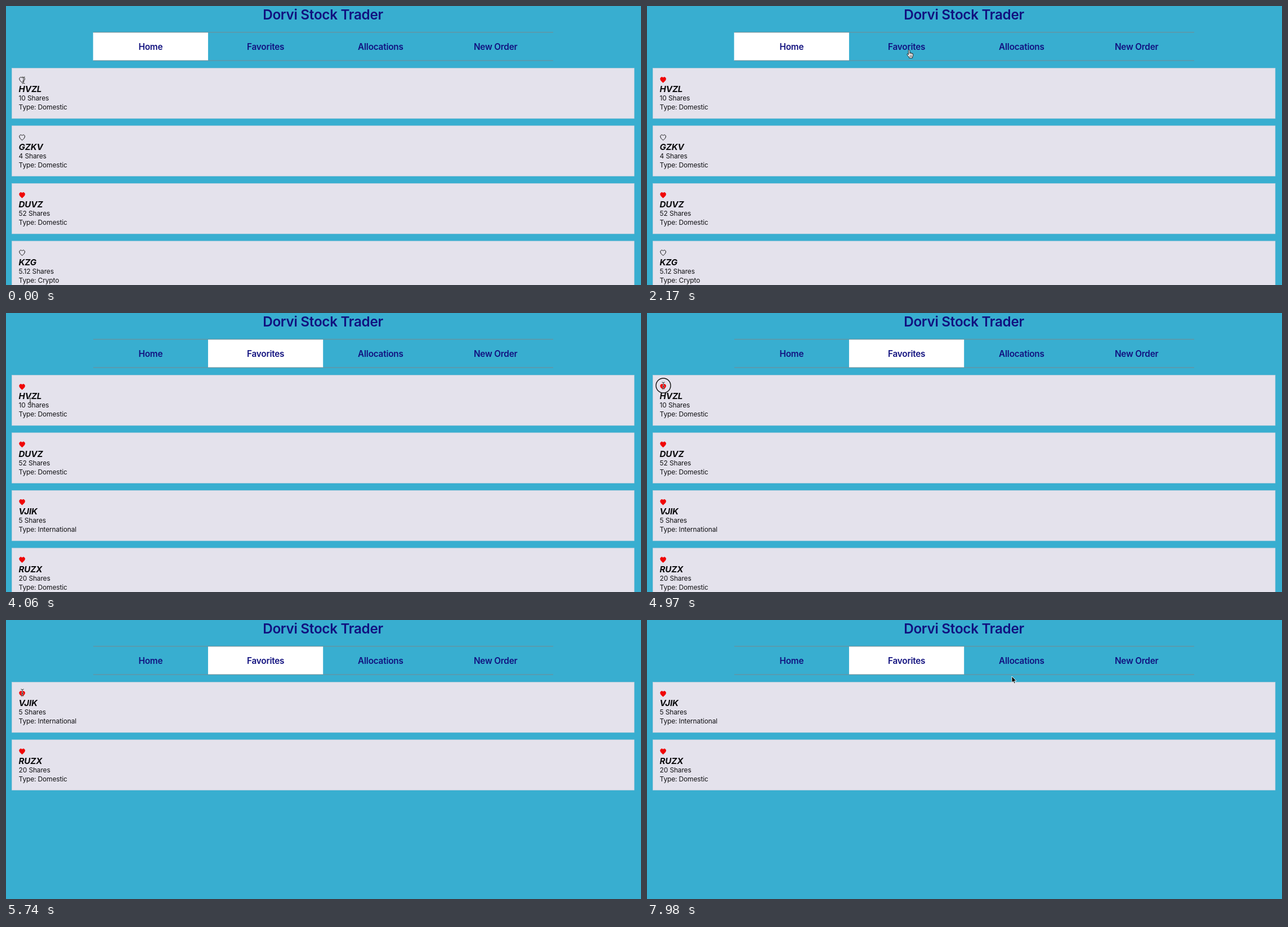
Write an HTML page that moves like this. It is 1128 by 496 pixels and loops after 8000 ms.

```html
<!DOCTYPE html>
<html lang="en">
<head>
<meta charset="utf-8">
<title>Stock list</title>
<style>
  html, body { margin: 0; width: 100%; height: 100%; overflow: hidden; background: #38aed0; }
  svg { display: block; width: 1128px; height: 496px; }
  text { font-family: Inter, "Liberation Sans", sans-serif; letter-spacing: -.013em; }
  .title { font-size: 24.3px; font-weight: 600; fill: #11117f; text-anchor: middle; }
  .tab { font-size: 15.3px; font-weight: 600; fill: #11117f; text-anchor: middle; }
  .name { font-size: 15.2px; font-weight: 700; font-style: italic; fill: #0b0b0d; }
  .info { font-size: 12px; fill: #111114; }
</style>
</head>
<body>
<svg id="stage" viewBox="0 0 1128 496">
  <rect width="1128" height="496" fill="#38aed0"/>
  <text class="title" x="563" y="24">Dorvi Stock Trader</text>
  <g id="nav">
    <rect id="active" y="47" width="204.25" height="50" fill="#fff"/>
    <path d="M155 46.8H972M155 97H972" stroke="#77898f"/>
  </g>
  <g id="cards"></g>
  <circle id="ring" r="13" fill="none" stroke="#111" stroke-width="1.4"/>
  <g id="beam" fill="none" stroke-linecap="round">
    <path id="beamLine" d="M-2.2 -6Q-.4 -6 0 -4.8Q.4 -6 2.2 -6M0 -4.8V4.8M-2.2 6Q-.4 6 0 4.8Q.4 6 2.2 6M-1.2 1.6H1.2" stroke="#fff" stroke-opacity=".6" stroke-width="2"/>
    <use href="#beamLine" style="stroke:#111"/>
    <path d="M-2.2 -6Q-.4 -6 0 -4.8Q.4 -6 2.2 -6M0 -4.8V4.8M-2.2 6Q-.4 6 0 4.8Q.4 6 2.2 6M-1.2 1.6H1.2" stroke="#16161a"/>
  </g>
  <path id="arrow" d="M0 0V11.4L2.6 9L4.4 13.1L6.3 12.3L4.6 8.3H8.1Z" fill="#080808" stroke="#fff" stroke-width=".9" stroke-linejoin="round"/>
  <g id="hand" stroke="#111" stroke-width=".9" stroke-linejoin="round" stroke-linecap="round">
    <path d="M-1.6 7.4V.6Q-1.5 -.7 -.4 -.7Q.7 -.7 .8 .6V4.2Q2.6 3.5 3 4.7Q4.6 4.1 5 5.4Q6.6 5 6.7 6.6V8.8Q6.5 10.6 5.6 11.8V13.4H-.4V12Q-2.4 9.8 -3.8 7.8Q-4.4 6.4 -3.3 6Q-2.4 5.9 -1.6 7.4Z" fill="#fff"/>
    <path d="M.8 4.2V6.4M3 4.7V6.8M5 5.4V7M.9 8.8V11.4M2.7 8.8V11.4M4.4 8.8V11.4" fill="none" stroke-width=".7"/>
  </g>
</svg>
<script>
const LOOP = 8000, STEP = 70, PITCH = 102.5;
const HEART = "M28.6 136.1C26.6 134.4 23.8 132.4 23.8 129.5C23.8 126.5 27.1 125.5 28.6 127.9C30.1 125.5 33.4 126.5 33.4 129.5C33.4 132.4 30.6 134.4 28.6 136.1Z";
const $ = id => document.getElementById(id);

function add(parent, tag, attrs, text = "") {
  const el = document.createElementNS("http://www.w3.org/2000/svg", tag);
  for (const key in attrs) el.setAttribute(key, attrs[key]);
  el.textContent = text;
  return parent.appendChild(el);
}

const tabX = i => 154.7 + 204.25 * i;
["Home", "Favorites", "Allocations", "New Order"].forEach((label, i) =>
  add($("nav"), "text", { class: "tab", x: tabX(i) + 102.2, y: 78 }, label));

const rows = [0, 1, 2, 3].map(i => {
  const g = add($("cards"), "g", { transform: `translate(0 ${i * PITCH})` });
  add(g, "rect", { x: 10.3, y: 110.4, width: 1105.7, height: 89.6, fill: "#e4e2ec", stroke: "#b9cddb", "stroke-width": .6 });
  return {
    g,
    heart: add(g, "path", { d: HEART, "stroke-width": 1 }),
    name: add(g, "text", { class: "name", x: 22.6, y: 153 }),
    shares: add(g, "text", { class: "info", x: 22.6, y: 168.2 }),
    type: add(g, "text", { class: "info", x: 22.6, y: 184.2 })
  };
});

const stock = (name, shares, type, liked) => ({ name, shares, type, liked });
const first = stock("HVZL", 10, "Domestic", true);
const second = stock("GZKV", 4, "Domestic", false);
const third = stock("DUVZ", 52, "Domestic", true);
const coin = stock("KZG", 5.12, "Crypto", false);
const favorites = [first, third, stock("VJIK", 5, "International", true), stock("RUZX", 20, "Domestic", true)];

const LIKE = 630, SWITCH = 2520, REMOVALS = [5040, 5670];
const CLICKS = [[490, 770], [2310, 2520], [4900, 5180], [5530, 5740]];

// Pointer path: time, x, y
const PATH = [
  [0, 31, 132], [490, 30.5, 131], [1330, 31, 131], [1400, 34, 132],
  [2170, 466, 79], [2310, 472, 75], [3220, 472, 75], [3900, 70, 164],
  [4060, 43, 157], [4760, 29, 129], [6300, 29, 129], [6370, 30, 130],
  [6720, 30, 130], [7070, 149, 159], [7980, 648, 100]
];

const slope = (i, k) => (PATH[i + 1][k] - PATH[i][k]) / (PATH[i + 1][0] - PATH[i][0]);

function tangent(i, k) {
  if (i === 0) return slope(0, k);
  if (i === PATH.length - 1) return slope(i - 1, k);
  const a = slope(i - 1, k), b = slope(i, k);
  return a * b > 0 ? 2 * a * b / (a + b) : 0;
}

// Smooth interpolation that never overshoots a key
function along(t, k) {
  let i = 0;
  while (i < PATH.length - 2 && t >= PATH[i + 1][0]) i++;
  const span = PATH[i + 1][0] - PATH[i][0];
  const u = Math.min(1, (t - PATH[i][0]) / span), v = 1 - u;
  return PATH[i][k] * v * v * (1 + 2 * u) + PATH[i + 1][k] * u * u * (3 - 2 * u)
    + span * u * v * (tangent(i, k) * v - tangent(i + 1, k) * u);
}

function show(el, on) {
  el.style.display = on ? "" : "none";
}

function drawCards(t) {
  const home = t < SWITCH;
  const list = home
    ? [{ ...first, liked: t >= LIKE }, second, third, coin]
    : favorites.slice(REMOVALS.filter(time => t >= time).length);
  $("active").setAttribute("x", tabX(home ? 0 : 1));
  rows.forEach((row, i) => {
    const item = list[i];
    show(row.g, item);
    if (!item) return;
    row.name.textContent = item.name;
    row.shares.textContent = `${item.shares} Shares`;
    row.type.textContent = `Type: ${item.type}`;
    row.heart.setAttribute("fill", item.liked ? "#f00505" : "none");
    row.heart.setAttribute("stroke", item.liked ? "#f00505" : "#111");
  });
}

function drawPointer(t) {
  const x = along(t, 1), y = along(t, 2);
  const overNav = x > 155 && x < 972 && y > 47 && y < 97;
  const overText = x < 115 && y > 122 && y < 190;
  const shape = overNav ? "hand" : overText ? "beam" : "arrow";
  for (const id of ["hand", "beam", "arrow", "ring"]) {
    $(id).setAttribute("transform", `translate(${x} ${y})`);
    show($(id), id === shape);
  }
  show($("ring"), CLICKS.some(([from, to]) => t >= from && t < to));
}

function draw(time) {
  const t = Math.floor(time % LOOP / STEP) * STEP;
  drawCards(t);
  drawPointer(t);
}

const start = performance.now();
function tick() {
  draw(performance.now() - start);
  requestAnimationFrame(tick);
}
tick();
</script>
</body>
</html>
```
